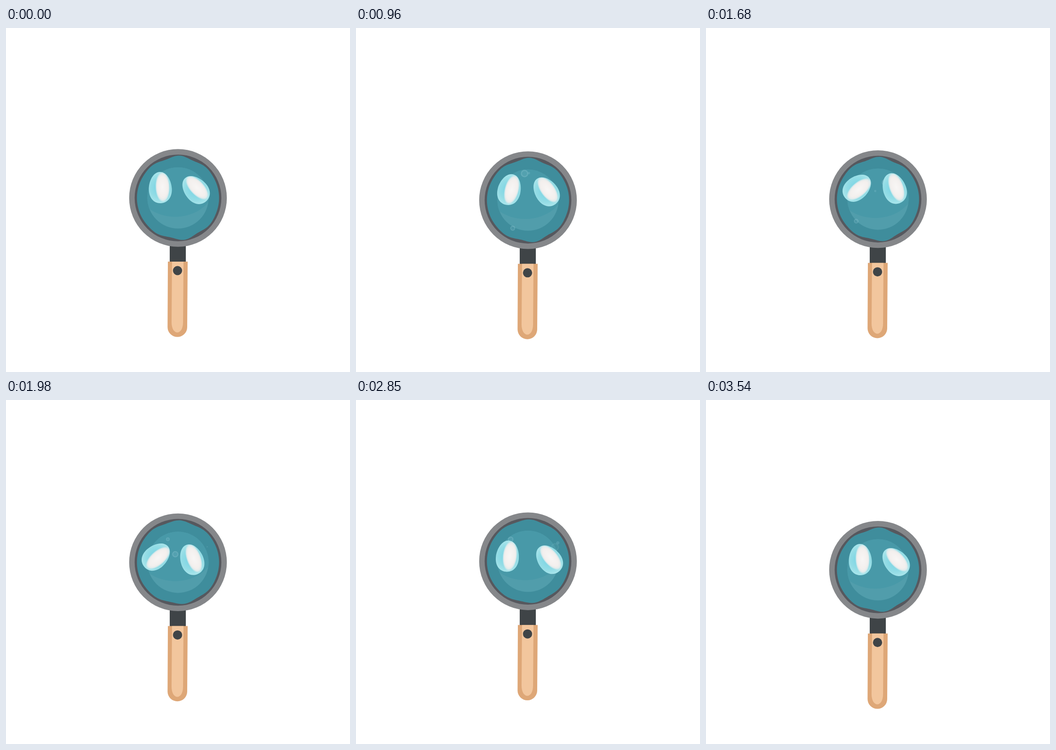
Animation, 748 px wide and 748 px high, one loop 3570 ms. Source, as an HTML page with a canvas:

```html
<!DOCTYPE html>
<html lang="en">
<head>
<meta charset="utf-8">
<title>Boiling eggs</title>
<style>
html, body { margin: 0; width: 100%; height: 100%; overflow: hidden; background: #fff; }
canvas { display: block; width: 748px; height: 748px; }
</style>
</head>
<body>
<canvas id="stage" width="748" height="748"></canvas>
<script>
const ctx = document.getElementById('stage').getContext('2d');
const LOOP = 3570, STEP = 30, TAU = Math.PI * 2, RAD = Math.PI / 180;
const PAN_X = 374, HIGH = 332.3, LOW = 374.5, REST = 369.5;

// Pan: [time, y] at each turn of the toss
const panKeys = [[0, REST], [545, HIGH], [945, LOW], [1318, HIGH], [1745, LOW],
  [2208, HIGH], [2632, LOW], [3035, HIGH], [LOOP, REST]];

// Eggs: [time, left x, left y, right x, right y]
const eggKeys = [[0, 335.5, 347, 412.5, 351.5], [570, 336, 347, 411, 360],
  [1350, 331, 355.5, 416, 351], [1980, 326.5, 340.5, 404, 347],
  [2430, 344, 350.5, 417, 348.5], [2850, 329.5, 339.5, 420, 346.5]];
eggKeys.push([LOOP, ...eggKeys[0].slice(1)]);

// Bubbles swell at random spots on the water, one after another
const BUBBLES = 15, BUBBLE_GAP = 185, BUBBLE_LIFE = 600, BUBBLE_R = 9.5;
let seed = 7;
const random = () => (seed = seed * 16807 % 2147483647) / 2147483647;
const bubbles = Array.from({ length: BUBBLES }, (_, i) => {
  const angle = random() * TAU, r = 80 * Math.sqrt(random());
  return { start: 60 + i * BUBBLE_GAP, x: r * Math.cos(angle), y: r * Math.sin(angle) };
});

// Ease in and out between the keys around t
function tween(keys, t) {
  const i = keys.findIndex(k => k[0] > t);
  const [t0, ...from] = keys[i - 1], [t1, ...to] = keys[i];
  const k = (1 - Math.cos(Math.PI * (t - t0) / (t1 - t0))) / 2;
  return from.map((v, j) => v + (to[j] - v) * k);
}

function ellipse(x, y, rx, ry, fill) {
  ctx.beginPath();
  ctx.ellipse(x, y, rx, ry, 0, 0, TAU);
  ctx.fillStyle = fill;
  ctx.fill();
}
const disc = (x, y, r, fill) => ellipse(x, y, r, r, fill);

function fillPath(d, fill) {
  ctx.fillStyle = fill;
  ctx.fill(new Path2D(d));
}

function drawHandle() {
  ctx.fillStyle = '#3f4447';
  ctx.fillRect(-18, 100, 35, 40);
  fillPath('M-22 138.5H21L20 281A21.3 21.3 0 0 1-22.7 281Z', '#dea777');
  fillPath('M-13 138.5H12L11 270C11 300-14 300-14 270Z', '#f2c69d');
  disc(-1, 158, 10, '#3f4447');
}

// The outline has a ripple at top and bottom: a peak when low, flat when high
function drawWater(y) {
  const lift = (LOW - y) / (LOW - HIGH);
  const ripple = 2.8 * (1 - 2 * lift ** 3);
  ctx.beginPath();
  for (let deg = 0; deg < 360; deg += 2) {
    const tilt = deg > 90 && deg < 270 ? -9 : 2;
    const phi = (deg - tilt) * RAD;
    const r = 89.3 + ripple * Math.cos(8 * phi) * Math.cos(phi) ** 4;
    ctx.lineTo(r * Math.sin(deg * RAD), -r * Math.cos(deg * RAD));
  }
  ctx.fillStyle = '#3f8d9c';
  ctx.fill();
  disc(0, 0, 66.5, '#519dab');
  ctx.save();
  ctx.clip();
  ellipse(-6, -27, 85, 68, '#4899a8');
  ctx.restore();
}

function drawBubbles(t) {
  for (const { start, x, y } of bubbles) {
    const age = (t - start) / BUBBLE_LIFE;
    if (age <= 0 || age >= 1) continue;
    const r = BUBBLE_R * age;
    ctx.globalAlpha = Math.min(1, (1 - age) * 8);
    disc(x, y, r, 'rgba(150,205,215,.16)');
    ctx.beginPath();
    ctx.arc(x, y, r * 0.8, 0, TAU);
    ctx.lineWidth = r * 0.3;
    ctx.strokeStyle = 'rgba(150,205,215,.25)';
    ctx.stroke();
  }
  ctx.globalAlpha = 1;
}

function radial(r0, r1, ...stops) {
  const g = ctx.createRadialGradient(0, 0, r0, 0, 0, r1);
  stops.forEach(([at, color]) => g.addColorStop(at, color));
  return g;
}

function drawEgg(x, y, angle) {
  ctx.save();
  ctx.translate(x, y);
  ctx.rotate(angle * RAD);
  const shell = new Path2D('M0-34C15-34 25-14 25 4C25 22 15 34 0 34S-25 22-25 4C-25-14-15-34 0-34Z');
  ctx.fillStyle = radial(8, 34, [0, '#7fd6e4'], [0.55, '#93dce5'], [1, '#aae6ec']);
  ctx.fill(shell);
  ctx.clip(shell);
  ctx.translate(5, -1);
  ctx.scale(0.48, 1);
  disc(0, 0, 33, radial(0, 33, [0, '#f8f6f5'], [0.7, '#f3efed'],
    [0.85, 'rgba(241,238,237,.85)'], [1, 'rgba(235,238,240,0)']));
  ctx.restore();
}

function draw(t) {
  const [y] = tween(panKeys, t);
  ctx.fillStyle = '#fff';
  ctx.fillRect(0, 0, 748, 748);
  ctx.save();
  ctx.translate(PAN_X, y);
  drawHandle();
  disc(0, 0, 106.2, '#85878a');
  disc(0, 0, 94.3, '#56585e');
  drawWater(y);
  drawBubbles(t);
  ctx.restore();

  // Both eggs roll over once and back, the right one less
  const [leftX, leftY, rightX, rightY] = tween(eggKeys, t);
  const roll = Math.exp(-(((t - 1800) / 773) ** 2));
  drawEgg(leftX, leftY, -2 + 53 * roll);
  drawEgg(rightX, rightY, -43 + 24 * roll);
}

const begin = performance.now();
function tick() {
  const t = (performance.now() - begin) % LOOP;
  draw(Math.floor(t / STEP) * STEP);
  requestAnimationFrame(tick);
}
tick();
</script>
</body>
</html>
```
